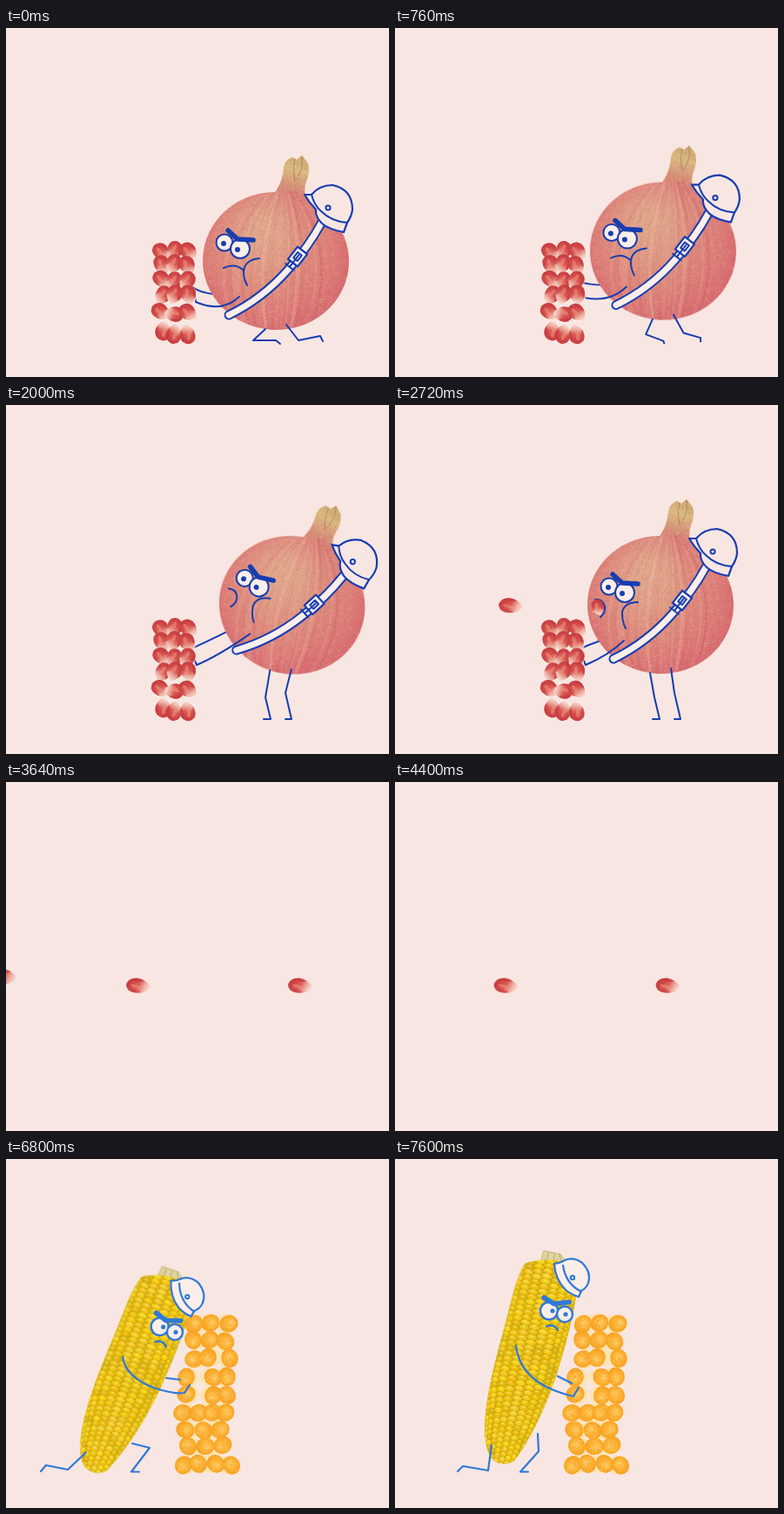
An HTML page with a canvas that plays this animation: 440 px wide and 400 px high, repeating every 8000 ms.

```html
<!DOCTYPE html>
<html lang="en">
<head>
<meta charset="utf-8">
<title>Seed fight</title>
<style>
html, body { margin: 0; width: 100%; height: 100%; overflow: hidden; background: #f8e6e2; }
canvas { display: block; }
</style>
</head>
<body>
<canvas id="stage" width="440" height="400"></canvas>
<script>
const LOOP = 8000, PAPER = '#f8e6e2', WHITE = '#fbeeea';
const NAVY = '#173db0', BLUE = '#3079d6';
const PAN = 2560, SEED_SPEED = 107 / 80;
const stage = document.getElementById('stage').getContext('2d');

let seed = 7;
const rand = (a = 0, b = 1) => {
  seed = (seed * 16807) % 2147483647;
  return a + (b - a) * seed / 2147483647;
};
const mix = (a, b, k) => a + (b - a) * k;
const clamp = v => Math.min(1, Math.max(0, v));
const ease = k => k * k * (3 - 2 * k);
// Progress that moves in held steps of 80 ms; the first step shows at the start time.
const steps = (t, start, count) => clamp((Math.floor((t - start) / 80) + 1) / count);

function sprite(w, h, draw) {
  const canvas = document.createElement('canvas');
  canvas.width = w;
  canvas.height = h;
  draw(canvas.getContext('2d'));
  return canvas;
}

function gradient(g, stops) {
  stops.forEach((color, i) => g.addColorStop(i / (stops.length - 1), color));
  return g;
}

function line(c, d, color, width = 2, fill) {
  const path = new Path2D(d);
  if (fill) { c.fillStyle = fill; c.fill(path); }
  c.strokeStyle = color;
  c.lineWidth = width;
  c.lineCap = c.lineJoin = 'round';
  c.stroke(path);
}

function dot(c, x, y, r, color, fill, width = 2) {
  c.beginPath();
  c.arc(x, y, r, 0, 7);
  if (fill) { c.fillStyle = fill; c.fill(); }
  c.strokeStyle = color;
  c.lineWidth = width;
  c.stroke();
}

function blob(c, x, y, rx, ry, angle, fill) {
  c.fillStyle = fill;
  c.beginPath();
  c.ellipse(x, y, rx, ry, angle, 0, 7);
  c.fill();
}

function drawSeed(c, x, y, angle = 0.12, w = 28, h = 17) {
  c.save();
  c.translate(x, y);
  c.rotate(angle);
  c.scale(w / 28, h / 17);
  const shape = new Path2D('M-14 0 Q-12 -8 -2 -8.5 Q8 -8 14 -1 Q13 4 6 7 Q-4 10 -11 6 Q-14 3 -14 0Z');
  c.fillStyle = gradient(c.createLinearGradient(-14, -6, 13, 5),
    ['#c23a3c', '#cf4446', '#da5a54', '#eeb0a2', '#fae6de']);
  c.fill(shape);
  c.clip(shape);
  blob(c, -3, -7, 9, 2.5, 0.05, '#c23a3c99');
  blob(c, -4, 7, 8, 2, 0, '#c23a3c88');
  blob(c, -3, 1, 6, 2, 0.1, '#f0a08a77');
  c.restore();
}

const pomegranate = sprite(440, 400, c => {
  const crown = new Path2D('M294 160 Q311 143 312 121 Q315 112 322 110 L327 113 L333 108 L340 117 Q343 127 338 138 Q334 148 339 160Z');
  c.fillStyle = gradient(c.createLinearGradient(330, 108, 316, 158), ['#c9a66e', '#dabb80', '#d59578', '#d67872']);
  c.fill(crown);
  line(c, 'M325 112 Q322 124 325 137 M333 110 Q335 124 327 135', '#8f6f4799', 1);
  const body = new Path2D();
  body.ellipse(303, 229, 84, 79, 0.05, 0, 7);
  c.fillStyle = gradient(c.createRadialGradient(288, 192, 8, 300, 222, 95),
    ['#e0ab8c', '#df9f86', '#de8d7e', '#dc7b77', '#d4626a']);
  c.fill(body);
  c.globalCompositeOperation = 'source-atop';
  // Soft streaks run from the crown down the skin, fine grain lies on top.
  for (let i = 0; i < 70; i++) {
    const x = rand(-90, 90);
    c.globalAlpha = 0.12;
    line(c, `M${310 + x * 0.2} 150 Q${303 + x} 225 ${303 + x * 0.5} 308`, i % 2 ? '#f0b79c' : '#cf545c', rand(1, 4));
  }
  const grains = ['#f3cf98', '#cb6064', '#f6bdac', '#c07c66', '#ec747e'];
  for (let i = 0; i < 11000; i++) {
    c.globalAlpha = rand(0.15, 0.5);
    c.fillStyle = grains[i % 5];
    c.fillRect(rand(217, 390), rand(108, 310), 1, 1);
  }
});

const seedWall = sprite(440, 400, c => {
  const rows = [255, 271, 289, 306, 326, 349];
  const places = rows.flatMap((y, r) => [179, 194, 209].map((x, i) => ({
    x: x + rand(-1.5, 1.5), y: y + rand(-2, 2),
    angle: r === 5 ? -1.5 + rand(-0.3, 0.3) : rand(0.5, 2.2) + (i % 2)
  })));
  places.forEach(p => blob(c, p.x, p.y, 11, 10, p.angle, '#fff1ebcc'));
  places.forEach(p => drawSeed(c, p.x, p.y, p.angle, 23, 18));
});

const corn = sprite(440, 400, c => {
  line(c, 'M166 120 L171 105 L190 109 L199 120Z', '#c9bd78', 1, '#ddd4a0');
  line(c, 'M176 107 L174 118 M183 108 L182 118 M189 109 L191 118', '#b9a95f', 1);
  const body = new Path2D('M149 120 C137 140 134 165 121 210 C109 255 104 280 103 310 Q104 336 112 344 Q123 354 137 346 C154 324 172 287 184 252 C196 215 205 180 209 150 Q208 126 194 118 Q170 112 149 120Z');
  c.clip(body);
  c.fillStyle = '#cba316';
  c.fillRect(90, 90, 130, 270);
  c.translate(122, 348);
  c.rotate(0.24);
  for (let s = -8; s < 250; s += 6) {
    const half = 18 + 21 * Math.pow(clamp((s + 8) / 105), 0.8);
    for (let col = -5; col <= 5; col++) {
      const a = col * 0.29, x = half * Math.sin(a), w = Math.max(1.8, half * 0.148 * Math.cos(a));
      const y = -s + (col & 1) * 3;
      blob(c, x, y, w, 2.9, 0, `hsl(${rand(47, 51)} ${rand(84, 94)}% ${rand(48, 56) - Math.abs(col)}%)`);
      c.fillStyle = '#fff19caa';
      c.fillRect(x - w * 0.4, y - 1.6, w * 0.7, 1.3);
    }
  }
});

const kernelWall = sprite(440, 400, c => {
  const rows = [
    [189, 216, 235, 256], [208, 215, 234, 252], [229, 216, 232, 257],
    [249, 207, 238, 254], [270, 207, 238, 254], [291, 203, 221, 237, 252],
    [310, 206, 227, 246], [328, 209, 229, 249], [350, 204, 221, 241, 259]];
  const places = rows.flatMap(([y, ...xs]) => xs.map(x => ({ x, y: y + rand(-1.5, 1.5), tilt: rand(0, 6.3) })));
  places.forEach(p => blob(c, p.x + (p.x < 235 ? 3 : -3), p.y, 12, 11, 0, '#fce4b4'));
  for (const { x, y, tilt } of places) {
    blob(c, x, y, 10.8, 9.8, tilt,
      gradient(c.createRadialGradient(x + 3 * Math.cos(tilt), y + 3 * Math.sin(tilt), 1, x, y, 11),
        ['#fdc75c', '#fcb840', '#fbab2b', '#f5a024']));
    for (let i = 0; i < 30; i++) {
      const a = rand(0, 6.3), r = rand(0, 9.5);
      c.fillStyle = i % 2 ? '#ffe5a299' : '#ee8f1466';
      c.fillRect(x + r * Math.cos(a), y + r * Math.sin(a), 1, 1);
    }
  }
});

function pose(dx, dy, degrees, px, py) {
  return new DOMMatrix().translate(dx + px, dy + py).rotate(degrees).translate(-px, -py);
}

function applied(m, draw) {
  stage.save();
  stage.transform(m.a, m.b, m.c, m.d, m.e, m.f);
  draw(stage);
  stage.restore();
}

// Legs and arms join a point on the body to fixed feet and hands.
const at = (m, x, y) => { const p = m.transformPoint({ x, y }); return `${p.x} ${p.y}`; };
const blend = (a, b, k) => a.map((v, i) => mix(v, b[i], k)).join(' ');

function spitting(t) {
  return t >= 2400 && t < 2960 && Math.floor((t - 2400) / 80) % 2 === 0;
}

function drawPomegranate(t) {
  const up = ease(steps(t, 520, 11));
  const lean = ease(steps(t, 1600, 6)) - steps(t, 2320, 2);
  const spit = spitting(t), puffed = spit || lean > 0.3;
  const m = pose(mix(7, 0, up) + 8 * lean + (spit ? 2 : 0), mix(38, 0, up), 10 * lean, 310, 330);

  line(stage, `M213 ${mix(296, 279, up)} Q${blend([222, 304], [225, 274], up)} ${at(m, 240, 268)}`, NAVY);
  applied(m, c => {
    c.drawImage(pomegranate, 0, 0);
    const strap = 'M355 186 Q341 212 317 239 Q288 272 249 291';
    line(c, strap, NAVY, 11);
    line(c, strap, WHITE, 7);
    c.save();
    c.translate(328, 224);
    c.rotate(0.66);
    line(c, 'M-7 -9 H7 V9 H-7Z', NAVY, 2.2, WHITE);
    line(c, 'M-3 -4 H3 V4 H-3Z M0 -2 V14 M-6 15 H6', NAVY, 2);
    c.restore();

    line(c, 'M336 153 L344 153 Q353 142 368 142 Q391 147 391 170 Q390 178 385 185 L381 196 Q364 193 356 186 Q348 178 349 170 Q341 162 336 153Z', NAVY, 2.2, PAPER);
    line(c, 'M344 153 Q347 165 355 172 Q367 184 385 185', NAVY);
    dot(c, 363, 168, 2.6, NAVY);

    dot(c, 244, 208, 9.5, NAVY, WHITE);
    dot(c, 262, 215, 11, NAVY, WHITE);
    dot(c, 243, 209, 2, NAVY, NAVY);
    dot(c, 259, 216, 2, NAVY, NAVY);
    line(c, 'M248 194 L259 204 L277 205', NAVY, 5.5);

    if (puffed) {
      line(c, 'M277 226 Q261 226 259 238 Q259 249 263 256', NAVY);
      line(c, 'M228 223 Q237 222 239 231 Q240 238 234 243', NAVY);
    } else {
      line(c, 'M243 237 Q256 231 265 239 M284 226 Q271 227 267 236 Q264 245 270 257', NAVY);
    }
    if (spit) drawSeed(c, 231, 232, 1.3, 19, 14);
  });

  line(stage, `M${blend([217, 304], [214, 286], up)} L${blend([218, 314], [219, 298], up)} Q${blend([248, 327], [245, 287], up)} ${at(m, 261, 270)}`, NAVY);
  line(stage, `M${at(m, 291, 307)} L${blend([284, 358], [298, 335], up)} L${blend([310, 358], [304, 360], up)} L${blend([315, 362], [296, 360], up)}`, NAVY);
  line(stage, `M${at(m, 315, 302)} L${blend([336, 358], [321, 330], up)} L${blend([361, 353], [328, 360], up)} L${blend([364, 359], [321, 360], up)}`, NAVY);
  stage.drawImage(seedWall, 0, 0);
}

function drawCorn(t) {
  const low = ease(steps(t, 4760, 2)) - ease(steps(t, 7360, 4));
  const jolt = t >= 5600 && t < 6080 && Math.floor((t - 5600) / 80) % 2 === 0 ? -2 : 0;
  const m = pose(-22 * low + jolt, 10 * low, 7.3 * low, 124, 348);

  stage.drawImage(kernelWall, 0, 0);
  line(stage, `M${blend([187, 249], [184, 251], low)} L${blend([203, 257], [200, 253], low)}`, BLUE, 2.2);
  applied(m, c => {
    c.drawImage(corn, 0, 0);
    line(c, 'M183 120 Q190 119 193 117 Q204 111 215 119 Q226 130 222 142 Q220 148 214 151 L211 158 Q202 155 196 150 Q184 138 183 120Z', BLUE, 2.2, WHITE);
    line(c, 'M193 122 Q196 143 214 152', BLUE, 2.2);
    dot(c, 204, 136, 2.2, BLUE);
    dot(c, 177, 174, 10, BLUE, WHITE, 2.4);
    dot(c, 195, 178, 9, BLUE, WHITE, 2.4);
    dot(c, 181, 174, 1.6, BLUE, BLUE);
    dot(c, 196, 178, 1.6, BLUE, BLUE);
    line(c, 'M171 159 L183 166 L200 164', BLUE, 5.5);
    line(c, 'M174 192 Q183 188 187 196', BLUE, 2.4);
  });

  line(stage, `M${at(m, 139, 214)} Q${blend([143, 248], [138, 251], low)} ${blend([180, 264], [172, 263], low)} Q195 270 ${blend([205, 272], [205, 268], low)} L${blend([211, 262], [211, 259], low)}`, BLUE, 2.2);
  line(stage, `M${at(m, 111, 328)} L${blend([107, 357], [71, 356], low)} L${blend([78, 352], [46, 351], low)} L${blend([72, 358], [40, 358], low)}`, BLUE, 2.2);
  line(stage, `M${blend([164, 315], [145, 326], low)} L${blend([165, 335], [165, 331], low)} L144 358.5 H153`, BLUE, 2.2);
}

// Camera travel: catches up with the seeds, flies along, then runs ahead to the corn.
const CAMERA = [[3200, 0, 0], [3640, 1009, 1.34], [4400, 2001, 1.34], [4720, PAN, 0]];
function camera(t) {
  if (t <= 3200) return 0;
  for (let i = 1; i < CAMERA.length; i++) {
    const [t0, x0, v0] = CAMERA[i - 1], [t1, x1, v1] = CAMERA[i];
    if (t > t1) continue;
    const d = t1 - t0, k = (t - t0) / d;
    return mix(x0, x1, ease(k)) + d * k * (1 - k) * (v0 * (1 - k) - v1 * k);
  }
  return PAN;
}

function drawSeeds(t, cam) {
  if (t < 3200) {
    for (let i = 0; i < 4; i++) {
      const n = Math.floor((t - 2400 - i * 160) / 80);
      if (n >= 1) drawSeed(stage, 240 - 107 * (n - 1), 230);
    }
  } else if (t < 4920) {
    const wallEdge = 268 + cam - PAN;
    [-2, 152, 338].forEach((x, i) => {
      const sx = x + cam - 1009 - SEED_SPEED * (t - 3640);
      if (sx > wallEdge + 8) drawSeed(stage, sx, i ? 233.5 : 223);
    });
  } else if (t < 5000) {
    drawSeed(stage, 316, 187, -0.7);
    drawSeed(stage, 333, 295, 0.6);
  }
  for (let i = 0; i < 3; i++) {
    const n = Math.floor((t - 5520 - i * 160) / 80);
    if (n === 0) drawSeed(stage, 386, 236);
    if (n === 1) drawSeed(stage, 283, 236);
    if (n === 2) drawSeed(stage, 322, 236 + [-45, 48, -28][i], [-0.7, 0.7, -0.4][i]);
  }
}

function shifted(x, draw, t) {
  if (Math.abs(x) > 440) return;
  stage.save();
  stage.translate(x, 0);
  draw(t);
  stage.restore();
}

function frame(now) {
  const t = Math.floor((now % LOOP) / 40) * 40;
  const cam = camera(t);
  stage.fillStyle = PAPER;
  stage.fillRect(0, 0, 440, 400);
  shifted(cam, drawPomegranate, t);
  shifted(cam - PAN, drawCorn, t);
  drawSeeds(t, cam);
}

const start = performance.now();
function tick() {
  frame(performance.now() - start);
  requestAnimationFrame(tick);
}
tick();
</script>
</body>
</html>
```
